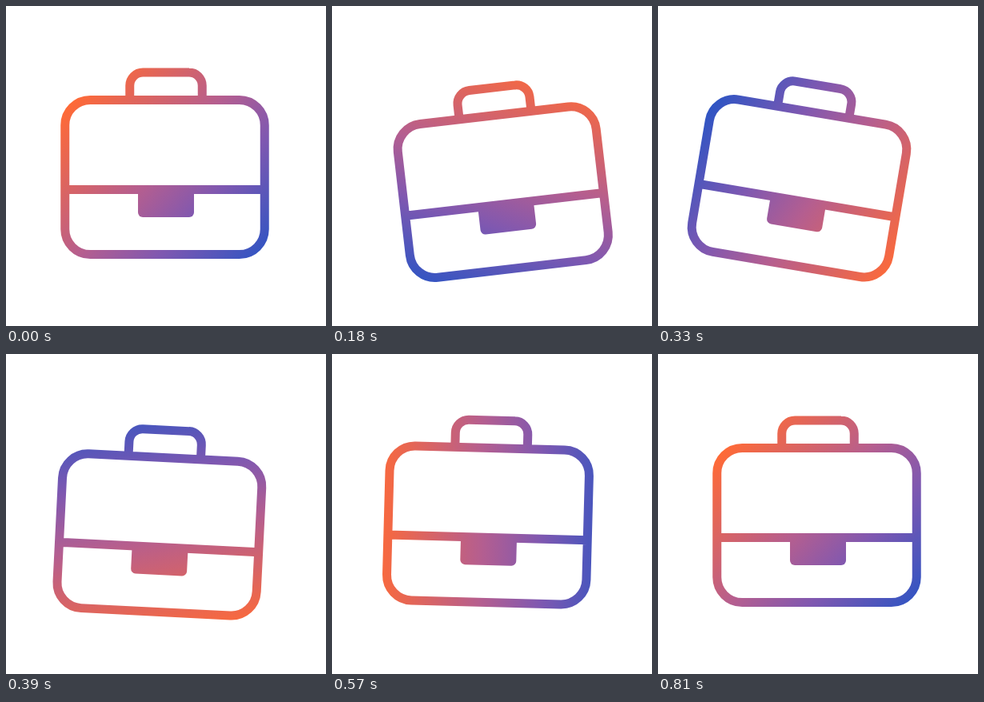
An HTML page with a canvas for the animation above (2840 ms loop, 400 px wide and 400 px high).

```html
<!DOCTYPE html>
<html lang="en">
<head>
<meta charset="utf-8">
<title>Swinging briefcase</title>
<style>
  html, body { margin: 0; width: 100%; height: 100%; overflow: hidden; background: #fff; }
  canvas { display: block; width: 400px; height: 400px; }
</style>
</head>
<body>
<canvas id="stage"></canvas>
<script>
const canvas = document.getElementById('stage');
const ctx = canvas.getContext('2d');
const ratio = window.devicePixelRatio || 1;
canvas.width = canvas.height = Math.round(400 * ratio);

const LOOP = 2840, STEP = 30, MOVE = 810;
const PIVOT = { x: 199, y: 82 };
const HUB = { x: 200, y: 212 };
const NEAR = 150, FAR = 172;

// [time in ms, swing in degrees]
const SWING = [[0, 0], [150, -9.3], [285, 11.8], [470, -3.05], [596, 2.1], [716, -0.9], [MOVE, 0]];
// [distance along the gradient axis, colour]
const STOPS = [[-NEAR, '#ff6a36'], [-12, '#b45e90'], [60, '#8058b0'], [FAR, '#2454c6']];

const smooth = x => x * x * (3 - 2 * x);

function swing(t) {
  for (let i = 1; i < SWING.length; i++) {
    const [t0, a] = SWING[i - 1], [t1, b] = SWING[i];
    if (t < t1) return a + (b - a) * smooth((t - t0) / (t1 - t0));
  }
  return 0;
}

function drop(t) {
  if (t >= 510) return 0;
  if (t < 125) return 19.5 * smooth(t / 125);
  return 19.5 * (1 - Math.pow((t - 125) / 385, 2.6));
}

function spin(t) {
  const x = Math.min(t / MOVE, 1);
  return 42 + 360 * smooth(1 - Math.pow(1 - x, 1.28));
}

const rad = deg => deg * Math.PI / 180;

// The gradient turns about a fixed point of the stage, apart from the case.
function paint(t) {
  const a = rad(spin(t)), c = Math.cos(a), s = Math.sin(a);
  const g = ctx.createLinearGradient(
    HUB.x - c * NEAR, HUB.y - s * NEAR, HUB.x + c * FAR, HUB.y + s * FAR);
  for (const [d, color] of STOPS) g.addColorStop((d + NEAR) / (NEAR + FAR), color);
  return g;
}

function drawCase() {
  ctx.lineWidth = 11;
  ctx.beginPath();
  ctx.roundRect(73.75, 117.5, 249.5, 193, 31.5);
  ctx.moveTo(74, 229.5);
  ctx.lineTo(323, 229.5);
  ctx.moveTo(154.75, 117);
  ctx.lineTo(154.75, 99.5);
  ctx.arcTo(154.75, 83, 171, 83, 16.5);
  ctx.lineTo(229, 83);
  ctx.arcTo(245.25, 83, 245.25, 99.5, 16.5);
  ctx.lineTo(245.25, 117);
  ctx.stroke();
  ctx.beginPath();
  ctx.roundRect(165, 226, 70, 38, [0, 0, 6, 6]);
  ctx.fill();
}

function render(t) {
  ctx.setTransform(ratio, 0, 0, ratio, 0, 0);
  ctx.globalCompositeOperation = 'source-over';
  ctx.clearRect(0, 0, 400, 400);
  ctx.save();
  ctx.translate(PIVOT.x, PIVOT.y + drop(t));
  ctx.rotate(rad(swing(t)));
  ctx.translate(-PIVOT.x, -PIVOT.y);
  drawCase();
  ctx.restore();
  ctx.globalCompositeOperation = 'source-in';
  ctx.fillStyle = paint(t);
  ctx.fillRect(0, 0, 400, 400);
}

const start = performance.now();
function tick(now) {
  const t = Math.max(0, now - start) % LOOP;
  render(Math.min(Math.floor(t / STEP) * STEP, MOVE));
  requestAnimationFrame(tick);
}
render(0);
requestAnimationFrame(tick);
</script>
</body>
</html>
```
